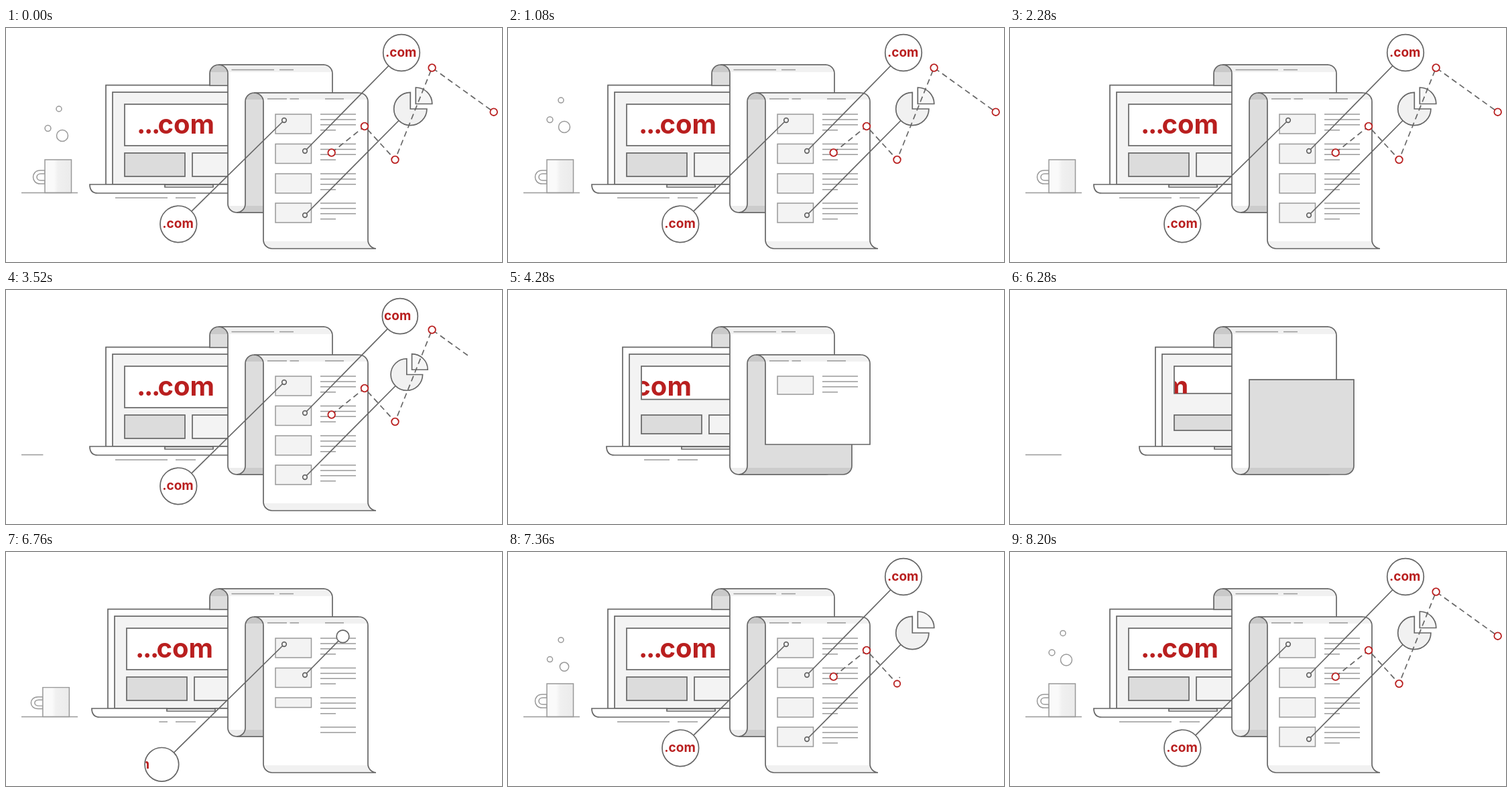
These frames come from a looping animation (740x350 px, 8240 ms). An HTML page:

```html
<!DOCTYPE html>
<html lang="en">
<head>
<meta charset="utf-8">
<title>Paper and laptop</title>
<style>
html, body { margin: 0; width: 100%; height: 100%; overflow: hidden; background: #fff; }
svg { display: block; width: 740px; height: 350px; }
text { font-family: Inter, "Open Sans", sans-serif; font-weight: 700; fill: #b91f1f; }
.ink { stroke: #666; stroke-width: 1.7; fill: none; }
.soft { stroke: #999; stroke-width: 1.5; fill: none; }
.red { stroke: #b91f1f; stroke-width: 1.8; fill: #fff; }
</style>
</head>
<body>
<svg id="stage" viewBox="0 0 740 350" xmlns="http://www.w3.org/2000/svg">
  <defs id="defs"></defs>
  <g id="scene"></g>
</svg>
<script>
const LOOP = 8240, STEP = 40, TURN = 5200;
const clamp = v => Math.max(0, Math.min(1, v));
const pow = n => x => x ** n;
const out = n => x => 1 - (1 - x) ** n;
const linear = x => x;
const inOut = x => x < .5 ? 2 * x * x : 1 - 2 * (1 - x) ** 2;
const back = s => x => 1 + (s + 1) * (x - 1) ** 3 + s * (x - 1) ** 2;

let now = 0;

// 1 = fully shown, 0 = gone; leaves before TURN, returns after it
function shown(enter, enterLen, leave, leaveLen, easeEnter = out(3), easeLeave = pow(3)) {
  return now < TURN
    ? 1 - easeLeave(clamp((now - leave) / leaveLen))
    : easeEnter(clamp((now - enter) / enterLen));
}

const line = (x1, y1, x2, y2, cls = 'ink') =>
  `<line x1="${x1}" y1="${y1}" x2="${x2}" y2="${y2}" class="${cls}"/>`;
const box = (x, y, w, h, fill, cls = 'ink') =>
  `<rect x="${x}" y="${y}" width="${w}" height="${h}" class="${cls}" style="fill:${fill}"/>`;
const ring = (x, y, r, cls = 'ink', fill = '#fff') =>
  r > .2 ? `<circle cx="${x}" cy="${y}" r="${r}" class="${cls}" style="fill:${fill}"/>` : '';
const path = (d, fill = 'none', cls = 'ink') =>
  `<path d="${d}" class="${cls}" style="fill:${fill}"/>`;

// Paper shading: hard horizontal bands across the stage
function bands(id, top, topTone, tone, low, lowTone) {
  const stop = (y, c) => `<stop offset="${y / 350}" stop-color="${c}"/>`;
  return `<linearGradient id="${id}" gradientUnits="userSpaceOnUse" x1="0" y1="0" x2="0" y2="350">
    ${stop(top, topTone)}${stop(top, tone)}${stop(low, tone)}${stop(low, lowTone)}</linearGradient>`;
}
document.getElementById('defs').innerHTML =
  bands('foldA', 66, '#c9c9c9', '#dddddd', 350, '#dddddd') +
  bands('faceB', 66, '#f1f1f1', '#ffffff', 266, '#ededed') +
  bands('foldC', 107, '#c9c9c9', '#dddddd', 266, '#cccccc') +
  bands('faceD', 107, '#f1f1f1', '#ffffff', 319, '#f1f1f1') +
  `<linearGradient id="mug"><stop offset=".35" stop-color="#fafafa"/>
    <stop offset=".5" stop-color="#f0f0f0"/><stop offset="1" stop-color="#ebebeb"/></linearGradient>
  <clipPath id="leftSide"><rect width="331" height="350"/></clipPath>`;

function cup() {
  const ground = shown(6150, 450, 3180, 400);
  const k = shown(6450, 600, 2650, 600, out(3), pow(2));
  const drift = -9 * Math.sin(Math.PI * (1 - k));
  let s = '';
  if (k > .01) {
    s += `<g transform="translate(${drift} ${246.5 * (1 - k)}) scale(1 ${k})">`
      + path('M58 213H51C37 213 37 233 51 233H58V228H52C44 228 44 218 52 218H58Z', '#fff', 'soft')
      + box(58, 197, 39.5, 49.5, 'url(#mug)', 'soft') + '</g>';
  }
  if (ground > 0) s += line(23, 246.5, 23 + 84 * ground, 246.5, 'soft');
  const bubbles = [[79, 121, 4, 0], [62.5, 150, 4.4, 80], [84, 161, 8.5, 160]];
  for (const [x, y, r, wait] of bubbles) {
    const age = now < TURN ? now : now - LOOP;
    const size = shown(7000 + wait, 500, 1550 + wait, 400);
    s += ring(x, y - age * .012, r * size, 'soft');
  }
  return s;
}

function laptop() {
  const slide = 206 * (1 - shown(5948, 1074, 3782, 1050));
  const word = -140 * (1 - shown(6224, 800, 3680, 800));
  const tall = shown(6100, 600, 3900, 650);
  const dash = 331 - 168 * shown(6544, 800, 3784, 800);
  let s = '<g clip-path="url(#leftSide)">';
  if (slide < 205) {
    s += `<g transform="translate(${slide} 0)">`
      + box(149, 85.5, 248, 149, '#fff') + box(159, 96, 228, 138, '#f3f3f3')
      + box(177, 114, 192, 62 * tall, '#fff')
      + box(177, 187, 90, 35 * tall, '#dcdcdc') + box(278, 187, 91, 35 * tall, '#f3f3f3')
      + `<clipPath id="panel"><rect x="178" y="114" width="190" height="${62 * tall}"/></clipPath>
        <g clip-path="url(#panel)"><g transform="translate(${word} 0)" font-size="40">
        <text x="195" y="158" letter-spacing="-2.4">...</text>
        <text x="311" y="158" text-anchor="end">com</text></g></g>`
      + path('M125 234H237V238H309V234H421C421 242 417 247 409 247H137C129 247 125 242 125 234Z', '#fff')
      + '</g>';
  }
  for (const [a, b] of [[163, 241], [253, 283]])
    if (dash < b) s += line(Math.max(a, dash), 254, b, 254, 'soft');
  return s + '</g>';
}

function rows() {
  let s = '';
  [129, 173.5, 218, 262].forEach((y, i) => {
    const k = shown(6410 + i * 110, 200, 4290 - i * 180, 160, linear, linear);
    const h = shown(6440 + i * 110, 200, 4270 - i * 180, 150, linear, linear);
    if (h > 0) s += box(402, y, 53.5, 29 * h, '#f3f3f3', 'soft');
    for (let j = 0; j < 4; j++)
      if (k > j * .06) s += line(469, y + j * 7.9, j < 3 ? 522 : 492, y + j * 7.9, 'soft');
  });
  return s;
}

// One ribbon: back, front, back, front
function paper() {
  const a = shown(5280, 430, 5000, 80, linear, linear);
  const b = shown(5720, 330, 4750, 250, linear, linear);
  const c = shown(6050, 290, 4510, 240, linear, linear);
  const d = shown(6340, 300, 4110, 400, linear, linear);
  let s = '';
  if (a > 0) {
    const top = 86 - 31 * a;
    s += path(a < 1 ? `M304 86V${top}H462V86Z`
      : 'M304 86V68A13 13 0 0 1 317 55H475A13 13 0 0 0 462 68V86Z', 'url(#foldA)');
  }
  if (b > 0) {
    const low = 55 + 221 * b, y = Math.min(68, low);
    const end = b < 1 ? `V${low}H331Z`
      : 'V263A13 13 0 0 1 474 276H344A13 13 0 0 1 331 263Z';
    s += path(`M331 ${y}A14 13 0 0 0 317 55H474A13 13 0 0 1 487 ${y}${end}`, 'url(#faceB)');
    if (low > 63) s += line(336.5, 62.5, 400, 62.5, 'soft') + line(408, 62.5, 429, 62.5, 'soft');
  }
  if (c > 0) {
    const top = 276 - 179 * c, y = Math.min(263, 276 - 13 * c);
    const head = c < 1 ? `V${top}H513`
      : 'V110A13 13 0 0 1 370 97H526A13 13 0 0 0 513 110';
    s += path(`M344 276A13 13 0 0 0 357 ${y}${head}V${Math.max(top, 263)}A13 13 0 0 1 500 276Z`, 'url(#foldC)');
  }
  if (d > 0) {
    const low = 97 + 233 * d, y = Math.min(110, low);
    const end = low < 317 ? `V${low}H384Z`
      : `V${low - 13}A13 13 0 0 0 552 ${low}H397A13 13 0 0 1 384 ${low - 13}Z`;
    s += path(`M384 ${y}A14 13 0 0 0 370 97H527A13 13 0 0 1 540 ${y}${end}`, 'url(#faceD)');
    s += `<clipPath id="sheet"><rect x="384" y="97" width="156" height="${low - 97}"/></clipPath>
      <g clip-path="url(#sheet)">`
      + line(390, 106, 419, 106, 'soft') + line(423.5, 106, 437, 106, 'soft')
      + line(476, 106, 504, 106, 'soft') + rows() + '</g>';
  }
  return s;
}

function bubble(id, x, y, dx, dy, enter, len, spring, wait, leave) {
  const reach = shown(enter, len, leave, 500, back(spring));
  const size = shown(enter, len, leave, 500, out(4), pow(2.5));
  const slip = -46 * (1 - shown(enter + wait, 500, leave - 80, 400));
  if (size <= 0) return '';
  const cx = x + dx * reach, cy = y + dy * reach, r = 27.3 * size;
  return line(x, y, cx, cy) + ring(x, y, 3.3 * Math.min(1, size * 3)) + ring(cx, cy, r)
    + `<clipPath id="${id}"><circle cx="${cx}" cy="${cy}" r="${Math.max(0, r - .8)}"/></clipPath>
      <g clip-path="url(#${id})"><text x="${cx - .8 + slip}" y="${cy + 6}" font-size="19"
      text-anchor="middle">.com</text></g>`;
}

function pie() {
  const x = 446, y = 280;
  const reach = shown(6900, 400, 3357, 500, back(1.5));
  const size = shown(6900, 400, 3357, 500, out(4));
  if (size <= 0) return '';
  const cx = x + 157.3 * reach, cy = y - 159 * reach;
  return line(x, y, cx, cy) + ring(x, y, 3.3 * Math.min(1, size * 3))
    + `<g transform="translate(${cx} ${cy}) scale(${size})">`
    + path('M0 0V-24.6A24.6 24.6 0 1 0 24.6 0Z', '#f1f1f1')
    + path('M8 -7.5V-32A24.5 24.5 0 0 1 32.5 -7.5Z', '#f6f6f6') + '</g>';
}

const POINTS = [[485.7, 186.5], [535, 147], [580.5, 197], [635.6, 59.5], [727.7, 125.7]];
const MARKS = [0];
for (let i = 1; i < POINTS.length; i++)
  MARKS.push(MARKS[i - 1] + Math.hypot(POINTS[i][0] - POINTS[i - 1][0], POINTS[i][1] - POINTS[i - 1][1]));

function chart() {
  const len = MARKS[4] * shown(7050, 730, 3320, 590, inOut, pow(2));
  if (len <= 0) return '';
  let d = 'M' + POINTS[0];
  for (let i = 1; i < POINTS.length && MARKS[i - 1] < len; i++) {
    const [x0, y0] = POINTS[i - 1], [x1, y1] = POINTS[i];
    const k = clamp((len - MARKS[i - 1]) / (MARKS[i] - MARKS[i - 1]));
    d += `L${x0 + (x1 - x0) * k} ${y0 + (y1 - y0) * k}`;
  }
  let s = `<path d="${d}" class="ink" stroke-dasharray="8.5 5.5"/>`;
  POINTS.forEach(([x, y], i) => {
    const k = i < 4 ? clamp((len - MARKS[i]) / 12) : shown(7770, 200, 3050, 260);
    s += ring(x, y, 5.3 * k, 'red');
  });
  return s;
}

const scene = document.getElementById('scene');
let last = -1;
function frame() {
  now = Math.floor(performance.now() % LOOP / STEP) * STEP;
  if (now !== last) {
    last = now;
    scene.innerHTML = cup() + laptop() + paper()
      + bubble('tagA', 415, 138, -157.7, 155.3, 6520, 500, 2.3, 220, 3560)
      + bubble('tagB', 446, 184, 144, -147, 6730, 300, 1.5, 130, 3397)
      + pie() + chart();
  }
  requestAnimationFrame(frame);
}
frame();
</script>
</body>
</html>
```
